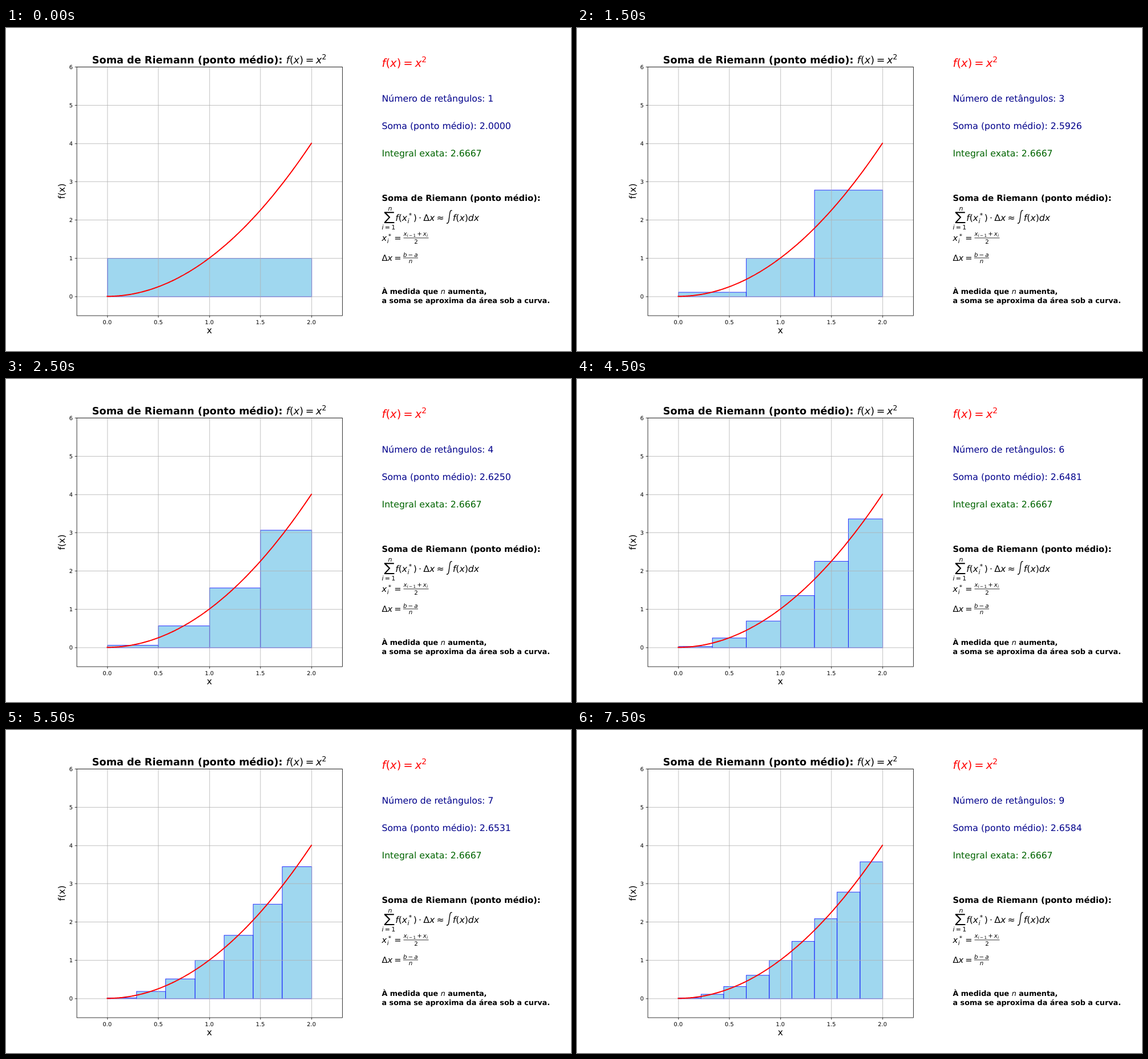
Recreate the animation shown at these times as an HTML page with a canvas. Size 990 px wide and 566 px high, loop 8 s.

```html
<!DOCTYPE html>
<html lang="pt">
<head>
<meta charset="utf-8">
<title>Soma de Riemann</title>
<style>
html, body { margin: 0; width: 100%; height: 100%; overflow: hidden; background: #fff; }
canvas { display: block; }
</style>
</head>
<body>
<canvas id="stage" width="990" height="566"></canvas>
<script>
const ctx = document.getElementById('stage').getContext('2d');
const LOOP = 8000, STEP = 1000;
const PT = 990 / 1008;      // stage pixels per point
const INK = 100 / 72;       // plot units per point
const AXES = { left: 175, right: 832.58, top: 96, bottom: 712 };
const TEXT_X = 658.5;

const f = x => x * x;
const plotX = x => AXES.left + (x + 0.3) / 2.6 * (AXES.right - AXES.left);
const plotY = y => AXES.bottom - (y + 0.5) / 6.5 * (AXES.bottom - AXES.top);
const stageX = x => plotX(x) * 990 / 1400;
const stageY = y => plotY(y) * 566 / 800;
const snap = v => Math.floor(v + 0.5) + 0.5;
// baseline of a line in the right panel, as a fraction of the axes height
const panelY = frac => 503.74 - frac * 435.82;

function setFont(points, style = '') {
  ctx.font = `${style} ${points * PT}px "DejaVu Sans", sans-serif`;
}

function text(str, x, y, points, { style = '', color = '#000', align = 'left' } = {}) {
  setFont(points, style);
  ctx.fillStyle = color;
  ctx.textAlign = align;
  ctx.fillText(str, x, y);
  return x + ctx.measureText(str).width;
}

// Sets letters in italics, gives operators space, returns the end position.
function math(str, x, y, points, color = '#000') {
  const gap = 0.2 * points * PT;
  for (const ch of str) {
    const space = '=≈·+−'.includes(ch) ? gap : 0;
    x = text(ch, x + space, y, points, { style: /[a-z]/.test(ch) ? 'italic' : '', color }) + space;
  }
  return x;
}

function square(x, y, points, color) {
  const end = math('f(x)=x', x, y, points, color);
  math('2', end, y - 0.383 * points * PT, points * 0.7, color);
}

// x with lower index i and an upper star
function starred(x, y, points) {
  const em = points * PT;
  const end = math('x', x, y, points);
  math('i', end + 0.03 * em, y + 0.25 * em, points * 0.7);
  math('*', end + 0.17 * em, y - 0.37 * em, points * 0.7);
  return end + 0.68 * em;
}

function line(x1, y1, x2, y2, color, width) {
  ctx.strokeStyle = color;
  ctx.lineWidth = width;
  ctx.beginPath();
  ctx.moveTo(x1, y1);
  ctx.lineTo(x2, y2);
  ctx.stroke();
}

function drawBars(n) {
  const dx = 2 / n;
  ctx.globalAlpha = 0.8;
  ctx.fillStyle = '#87ceeb';
  ctx.strokeStyle = '#00f';
  ctx.lineWidth = INK;
  ctx.lineJoin = 'miter';
  for (let i = 0; i < n; i++) {
    const x = snap(plotX(i * dx)), y = snap(plotY(f((i + 0.5) * dx)));
    const w = snap(plotX((i + 1) * dx)) - x, h = snap(plotY(0)) - y;
    ctx.fillRect(x, y, w, h);
    ctx.strokeRect(x, y, w, h);
  }
  ctx.globalAlpha = 1;
}

function drawPlot(n) {
  const left = snap(AXES.left), right = snap(AXES.right);
  const top = snap(AXES.top), bottom = snap(AXES.bottom);
  const thin = 0.8 * INK, tick = 3.5 * INK;
  ctx.save();
  ctx.scale(990 / 1400, 566 / 800);
  drawBars(n);
  for (let i = 0; i <= 4; i++) {
    const x = snap(plotX(i / 2));
    line(x, top, x, bottom, '#b0b0b0', thin);
    line(x, bottom, x, bottom + tick, '#000', thin);
  }
  for (let i = 0; i <= 6; i++) {
    const y = snap(plotY(i));
    line(left, y, right, y, '#b0b0b0', thin);
    line(left - tick, y, left, y, '#000', thin);
  }
  ctx.strokeStyle = '#f00';
  ctx.lineWidth = 2 * INK;
  ctx.lineCap = 'square';
  ctx.lineJoin = 'round';
  ctx.beginPath();
  for (let i = 0; i <= 200; i++) ctx.lineTo(plotX(i / 100), plotY(f(i / 100)));
  ctx.stroke();
  ctx.lineCap = 'butt';
  ctx.lineJoin = 'miter';
  ctx.strokeStyle = '#000';
  ctx.lineWidth = thin;
  ctx.strokeRect(left, top, right - left, bottom - top);
  ctx.restore();
}

function drawLabels() {
  for (let i = 0; i <= 4; i++) text((i / 2).toFixed(1), stageX(i / 2), 518.5, 10, { align: 'center' });
  for (let i = 0; i <= 6; i++) text(i, 116.9, stageY(i) + 3.7, 10, { align: 'right' });
  text('x', 356.3, 535.4, 16, { align: 'center' });
  ctx.save();
  ctx.translate(102.8, 286);
  ctx.rotate(-Math.PI / 2);
  text('f(x)', 0, 0, 16, { align: 'center' });
  ctx.restore();
  const end = text('Soma de Riemann (ponto médio): ', 150.8, 61.7, 18, { style: 'bold' });
  square(end, 61.7, 18, '#000');
}

function drawSumSign(x, y) {
  const corners = [[0, 0], [17, 0], [17, 1.9], [3.6, 1.9], [10.6, 9.3], [3, 17.7],
    [17.6, 17.7], [17.6, 19.6], [0, 19.6], [0, 17.9], [7.9, 9.5], [0, 1.7]];
  ctx.fillStyle = '#000';
  ctx.beginPath();
  for (const [dx, dy] of corners) ctx.lineTo(x + dx, y + dy);
  ctx.fill();
}

function drawIntegralSign(x, y) {
  ctx.strokeStyle = '#000';
  ctx.lineWidth = 1.35;
  ctx.beginPath();
  ctx.moveTo(x, y);
  ctx.bezierCurveTo(x + 3.6, y + 1.3, x + 3.7, y - 3.5, x + 4.8, y - 11.2);
  ctx.bezierCurveTo(x + 5.8, y - 19.5, x + 6.3, y - 23.5, x + 9.7, y - 22);
  ctx.stroke();
}

function drawFormulas() {
  let y = panelY(0.38);
  math('n', 669.6, 319.6, 11.2);
  drawSumSign(662.8, 322.3);
  math('i=1', TEXT_X, 352.7, 11.2);
  let x = starred(math('f(', 682.2, y, 16), y, 16);
  math(')·Δx≈', x, y, 16);
  drawIntegralSign(772, 342);
  math('f(x)dx', 782.8, y, 16);

  y = panelY(0.30);
  math('=', starred(TEXT_X, y, 15), y, 15);
  x = math('x', 696.5, 363.9, 10.5);
  x = math('i−1', x, 365.7, 7.35);
  x = math('+x', x, 363.9, 10.5);
  x = math('i', x, 365.7, 7.35);
  line(696.5, 367.9, 740.5, 367.9, '#000', 0.8);
  math('2', 715.2, 378.4, 10.5);

  y = panelY(0.22);
  math('Δx=', TEXT_X, y, 15);
  math('b−a', 695.9, 401, 10.5);
  line(695.9, 402.9, 722, 402.9, '#000', 0.8);
  math('n', 705.7, 412.4, 10.5);
}

function drawPanel(n) {
  const blue = { color: '#00008b' }, bold = { style: 'bold' };
  let sum = 0;
  for (let i = 0; i < n; i++) sum += f((i + 0.5) * 2 / n) * 2 / n;
  square(TEXT_X, panelY(1), 20, '#f00');
  text(`Número de retângulos: ${n}`, TEXT_X, panelY(0.86), 16, blue);
  text(`Soma (ponto médio): ${sum.toFixed(4)}`, TEXT_X, panelY(0.75), 16, blue);
  text('Integral exata: 2.6667', TEXT_X, panelY(0.64), 16, { color: '#006400' });
  text('Soma de Riemann (ponto médio):', TEXT_X, panelY(0.46), 15, bold);
  drawFormulas();
  let x = text('À medida que ', TEXT_X, 466, 13, bold);
  x = math('n', x, 466, 13);
  text(' aumenta,', x, 466, 13, bold);
  text('a soma se aproxima da área sob a curva.', TEXT_X, panelY(0.05), 13, bold);
}

let shown = 0;
function frame(now) {
  const n = Math.floor((now % LOOP + STEP / 2) / STEP) + 1;
  if (n !== shown) {
    shown = n;
    ctx.fillStyle = '#fff';
    ctx.fillRect(0, 0, 990, 566);
    drawPlot(n);
    drawLabels();
    drawPanel(n);
  }
  requestAnimationFrame(frame);
}

ctx.textRendering = 'geometricPrecision';
frame(0);
</script>
</body>
</html>
```
